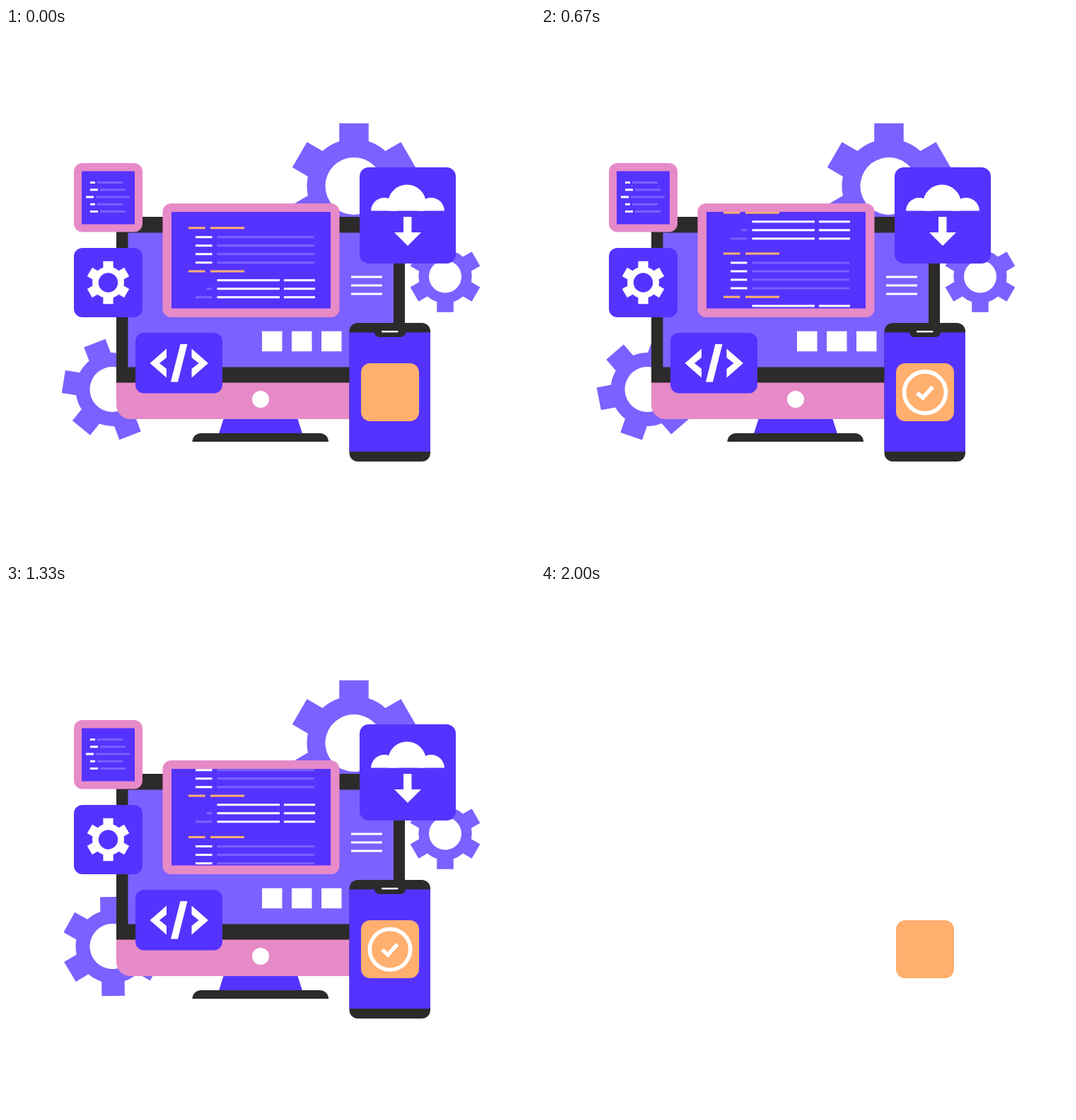
An HTML page for the animation above (2040 ms loop, 748x748 px).

```html
<!DOCTYPE html>
<html lang="en">
<head>
<meta charset="utf-8">
<title>Development icons</title>
<style>
  html, body { margin: 0; width: 100%; height: 100%; overflow: hidden; background: #fff; }
  svg { display: block; width: 100vw; height: 100vh; }
  .light { fill: #7b61ff; }
  .blue { fill: #5533ff; }
  .pink { fill: #e78ac8; }
  .dark { fill: #2d2a2a; }
  .orange { fill: #ffaf6e; }
  .white { fill: #fff; }
  .tick { fill: none; stroke: #fff; stroke-width: 5.5; }
</style>
</head>
<body>
<svg viewBox="0 0 748 748">
  <defs>
    <clipPath id="codeClip"><rect x="234" y="260" width="225" height="136.5"/></clipPath>
    <clipPath id="phoneClip"><rect x="485.5" y="417" width="114.5" height="196" rx="12"/></clipPath>
    <clipPath id="cloudClip"><rect x="510" y="215" width="120" height="43.5"/></clipPath>
  </defs>
  <g id="scene">
    <g id="backGears"></g>

    <!-- monitor -->
    <path class="dark" d="M156 502V279a12 12 0 0 1 12-12H552a12 12 0 0 1 12 12V502z"/>
    <rect class="light" x="172.5" y="289.5" width="375.5" height="190"/>
    <path class="pink" d="M156 501.5H564V533a20 20 0 0 1-20 20H176a20 20 0 0 1-20-20z"/>
    <circle class="white" cx="360" cy="525" r="12"/>
    <path class="blue" d="M307.5 553H412.5L419 573.5H301z"/>
    <path class="dark" d="M263.5 585a12 12 0 0 1 12-12H444a12 12 0 0 1 12 12z"/>
    <g id="screenItems" class="white"></g>

    <!-- code window -->
    <rect class="pink" x="221.5" y="248" width="250" height="161" rx="12"/>
    <rect class="blue" x="234" y="260" width="225" height="136.5"/>
    <g id="code" clip-path="url(#codeClip)"></g>

    <!-- small cards -->
    <rect class="pink" x="96" y="191" width="97" height="97.5" rx="12"/>
    <rect class="blue" x="107" y="202.5" width="75" height="75"/>
    <g id="snippet"></g>
    <rect class="blue" x="96" y="311" width="97" height="98" rx="12"/>
    <g id="cardGear"></g>
    <rect class="blue" x="183" y="431" width="123" height="85.5" rx="12"/>
    <path class="white" d="M203.5 474L227 453.5V466L217 474L227 482V494.5zM286 474L262.5 453.5V466L272.5 474L262.5 482V494.5zM246.5 447H256.5L243 500.5H233z"/>

    <!-- cloud card -->
    <rect class="blue" x="500" y="197" width="136" height="136" rx="13"/>
    <g class="white" clip-path="url(#cloudClip)">
      <circle cx="535" cy="259" r="19"/>
      <circle cx="567" cy="248.5" r="27"/>
      <circle cx="601" cy="259" r="19"/>
    </g>
    <path class="white" d="M562 267H573.5V289H587L568 308L549 289H562z"/>

    <!-- phone -->
    <g clip-path="url(#phoneClip)">
      <rect class="dark" x="485" y="417" width="116" height="197"/>
      <rect class="blue" x="485" y="430.5" width="116" height="168.5"/>
      <path class="dark" d="M521 430V430a7 7 0 0 0 7 7H558a7 7 0 0 0 7-7z"/>
      <rect class="white" x="531" y="428" width="23.5" height="2.5" rx="1"/>
    </g>
  </g>
  <rect class="orange" x="502" y="474" width="82" height="82" rx="13"/>
  <g id="badge" class="tick">
    <circle r="28.7"/>
    <path d="M-11 0.5L-3 7.5L10.5-7.5"/>
  </g>
</svg>
<script>
const FPS = 24, LOOP = 2040, LAST = 48;
const NS = 'http://www.w3.org/2000/svg';
const byId = id => document.getElementById(id);

function add(parent, tag, attrs) {
  const node = document.createElementNS(NS, tag);
  for (const key in attrs) node.setAttribute(key, attrs[key]);
  return parent.appendChild(node);
}

// Horizontal bar from x1 to x2, centred on y.
function bar(parent, color, x1, x2, y, h = 3) {
  add(parent, 'rect', { class: color, x: x1, y: y - h / 2, width: x2 - x1, height: h });
}

function gearPath(reach, body, hole, tooth) {
  const half = tooth / 2, base = Math.sqrt(body * body - half * half);
  let d = '';
  for (let k = 0; k < 6; k++) {
    const a = k * Math.PI / 3, c = Math.cos(a), s = Math.sin(a);
    const at = (x, y) => (x * c - y * s).toFixed(2) + ' ' + (x * s + y * c).toFixed(2);
    d += (k ? `A${body} ${body} 0 0 1 ` : 'M') + at(-half, -base) +
      'L' + at(-half, -reach) + 'L' + at(half, -reach) + 'L' + at(half, -base);
  }
  return d + `A${body} ${body} 0 0 1 ${-half} ${-base}z` +
    `M${hole} 0A${hole} ${hole} 0 1 0 ${-hole} 0A${hole} ${hole} 0 1 0 ${hole} 0z`;
}

const gears = [];
function gear(parent, color, x, y, size, start, speed) {
  const node = add(parent, 'path', { class: color, 'fill-rule': 'evenodd', d: gearPath(...size) });
  gears.push({ node, x, y, start, speed });
}

gear(byId('backGears'), 'light', 492, 223.5, [88.7, 66.5, 40.5, 41.5], 0, 7.5);
gear(byId('backGears'), 'light', 621, 351.5, [50.2, 37.7, 23, 23.5], 0, 7.5);
gear(byId('backGears'), 'light', 150.5, 511, [70, 52, 32, 32.5], -21, 2.5);
gear(byId('cardGear'), 'white', 144.5, 360, [30.2, 22.5, 13.7, 14.2], 0, 7.5);

// Static bars and tiles on the monitor
[352, 364, 376].forEach(y => bar(byId('screenItems'), 'white', 488, 532, y));
[362, 404, 446].forEach(x => bar(byId('screenItems'), 'white', x, x + 28.5, 443, 28.5));

// Rows: white start, white end, light start, light end
[[119, 126, 129, 165], [119, 130, 133, 169], [113, 124, 127, 175],
 [119, 126, 129, 165], [119, 130, 133, 169]].forEach(([a, b, c, d], i) => {
  const y = 218.5 + i * 10.25;
  bar(byId('snippet'), 'white', a, b, y);
  bar(byId('snippet'), 'light', c, d, y);
});

function heading(parent, y) {
  bar(parent, 'orange', 258, 281.5, y);
  bar(parent, 'orange', 289, 337, y);
}

function codeBlock() {
  const block = add(byId('code'), 'g', {});
  heading(block, 0);
  for (let i = 0; i < 4; i++) {
    bar(block, 'white', 268, 291.5, 13 + i * 12);
    bar(block, 'light', 298.5, 436, 13 + i * 12);
  }
  heading(block, 61.3);
  for (let i = 0; i < 3; i++) {
    const y = 74 + i * 12;
    bar(block, 'white', 298.5, 387, y);
    bar(block, 'white', 393, 437, y);
    if (i) bar(block, 'light', i === 1 ? 283.5 : 268, 291.5, y);
  }
  return block;
}

// Each block scrolls from its start height at its own speed per step.
const blocks = [[282.7, 5.18], [401.2, 5.14], [504.4, 4.62]]
  .map(([y, speed]) => ({ node: codeBlock(), y, speed }));

function badgeScale(n) {
  if (n < 11) return n * 1.15 / 11;
  return n < 17 ? 1.15 - (n - 11) * 0.025 : 1;
}

function draw(n) {
  const ended = n >= LAST;
  byId('scene').style.display = ended ? 'none' : '';
  byId('badge').style.display = ended || n === 0 ? 'none' : '';
  byId('badge').setAttribute('transform', `translate(543 515.3) scale(${badgeScale(n)})`);
  for (const g of gears)
    g.node.setAttribute('transform', `translate(${g.x} ${g.y}) rotate(${g.start + g.speed * n})`);
  for (const b of blocks)
    b.node.setAttribute('transform', `translate(0 ${b.y - b.speed * n})`);
}

const begin = performance.now();
function tick() {
  const time = (performance.now() - begin) % LOOP;
  // Steps at 24 per second, snapped to hundredths of a second
  const snapped = Math.floor(time / 10) * 10 + 4.99;
  draw(Math.min(LAST, Math.floor(snapped * FPS / 1000)));
  requestAnimationFrame(tick);
}
tick();
</script>
</body>
</html>
```
